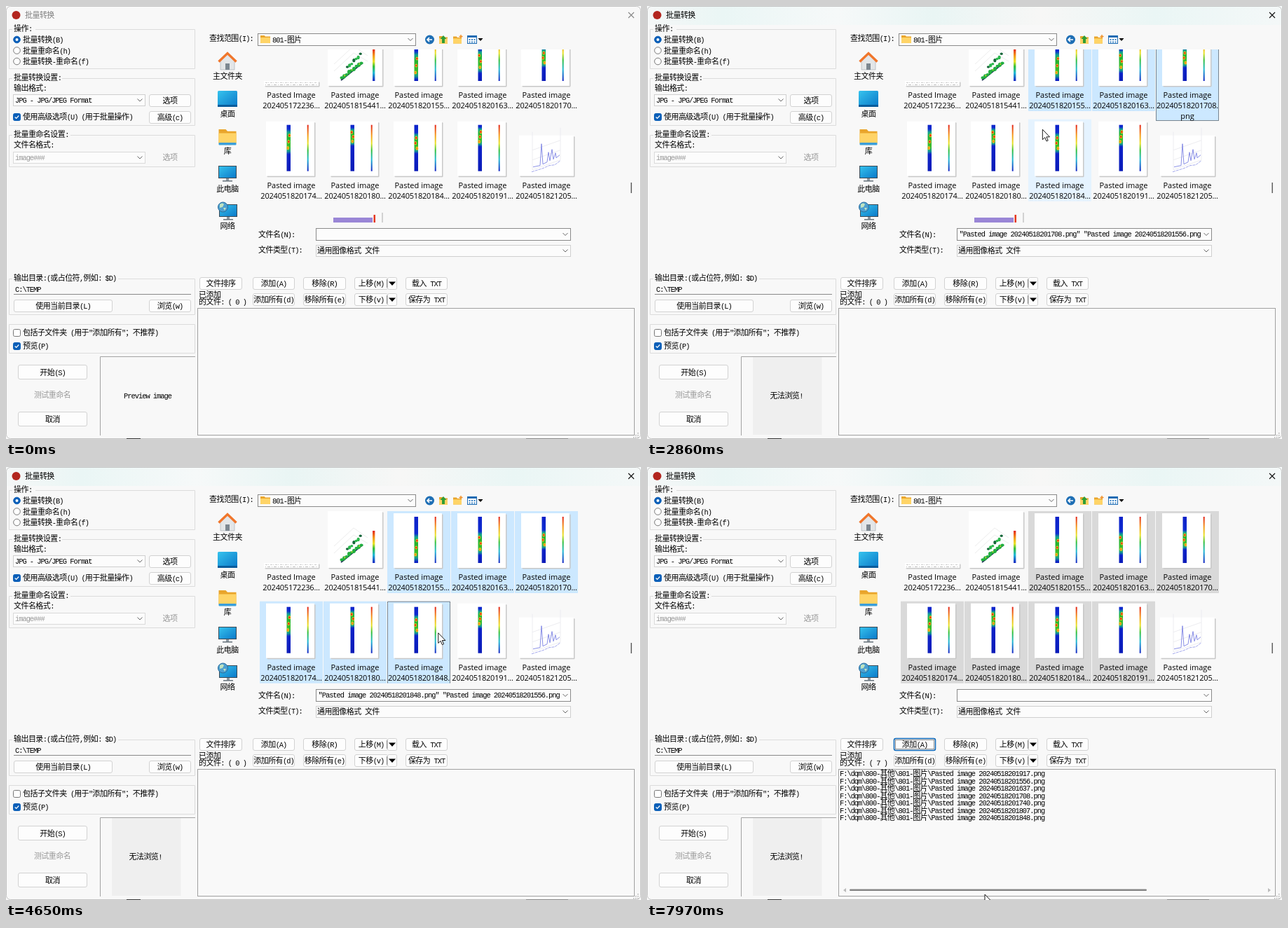
An HTML page that plays this animation: 906 px wide and 618 px high, repeating every 8000 ms.

```html
<!DOCTYPE html>
<html lang="zh">
<head>
<meta charset="utf-8">
<style>
html,body{margin:0;width:100%;height:100%;overflow:hidden;background:#f8f8f8}
svg{display:block;width:906px;height:618px}
text{fill:#000;white-space:pre}
.k{font:11px "Noto Sans CJK SC","Noto Sans CJK",sans-serif;letter-spacing:-.55px}
.m{font:10.4px "Liberation Mono",monospace;letter-spacing:-1.02px}
.n{font:11px "Open Sans",sans-serif}
.d{letter-spacing:-.2px}
.c{text-anchor:middle}
.off{fill:#999}
.ln{fill:none;stroke:#dcdcdc}
.ch{fill:none;stroke:#666}
</style>
</head>
<body>
<svg id="stage" viewBox="0 0 906 618"></svg>
<script>
const stage = document.getElementById('stage');
const LOOP = 8000;

// ---- drawing helpers ----
const rect = (x, y, w, h, fill, more = '') => `<rect x="${x}" y="${y}" width="${w}" height="${h}" fill="${fill}" ${more}/>`;
const path = (d, more) => `<path d="${d}" ${more}/>`;
const disc = (x, y, r, fill, more = '') => `<circle cx="${x}" cy="${y}" r="${r}" fill="${fill}" ${more}/>`;
const blob = (x, y, rx, ry, fill) => `<ellipse cx="${x}" cy="${y}" rx="${rx}" ry="${ry}" fill="${fill}"/>`;
const tag = id => id ? `id="${id}"` : '';
const runs = s => s.replace(/[\u2e80-\uffef]+|[^\u2e80-\uffef]+/g,
  r => `<tspan class="${/[\u2e80-\uffef]/.test(r) ? 'k' : 'm'}">${r}</tspan>`);
const text = (x, y, s, cls = '', id = '') => `<text x="${x}" y="${y}" class="${cls}" ${tag(id)}>${runs(s)}</text>`;
const box = (x, y, x2, y2, fill, stroke, more = '') =>
  rect(x + .5, y + .5, x2 - x - 1, y2 - y - 1, fill, `stroke="${stroke}" ${more}`);
const chevron = (x, y) => path(`M${x - 3.5} ${y - 2}l3.5 3.5 3.5-3.5`, 'class="ch"');
const button = (x, y, x2, y2, s, id = '') =>
  box(x, y, x2, y2, '#fdfdfd', '#d2d2d2', `rx="2.5" ${tag(id)}`) + text((x + x2) / 2, (y + y2) / 2 + 4, s, 'c');
const combo = (x, y, x2, y2, stroke, id = '') =>
  box(x, y, x2, y2, '#fcfcfc', stroke, tag(id)) + chevron(x2 - 8, (y + y2) / 2);
const group = (y, y2, s, w) =>
  path(`M9 ${y}.5H4.5V${y2}.5H269.5V${y}.5H${w}`, 'class="ln"') + text(11, y + 3, s);
const check = (y, on) => box(10, y, 21, y + 11, on ? '#0a5fb8' : '#fff', on ? '#0a5fb8' : '#777', 'rx="2"') +
  (on ? path(`M12.7 ${y + 5.5}l2 2 3.6-4`, 'fill="none" stroke="#fff" stroke-width="1.2"') : '');
const radio = (y, on) => disc(15.5, y, 4.8, on ? '#0a5fb8' : '#fff', `stroke="${on ? '#0a5fb8' : '#777'}"`) +
  (on ? disc(15.5, y, 2, '#fff') : '');
const folder = (x, y, w, h) =>
  path(`M${x} ${y}h${w * .4}l${w * .1} ${h * .14}h${w * .5}v${h * .86}h${-w}z`, 'fill="#e9a52c"') +
  rect(x, y + h * .28, w, h * .72, '#ffd467', 'rx="1"');
const monitor = (x, y) => box(x, y, x + 26, y + 18, 'url(#sea)', '#3d4a55') +
  rect(x + 11, y + 18, 4, 3, '#8b969e') + rect(x + 6, y + 21, 14, 1.5, '#67737c');
const stops = list => list.map(([o, c]) => `<stop offset="${o}" stop-color="${c}"/>`).join('');

// ---- thumbnails ----
// column, row, label, time part of the file name, heat centre and half height
const items = [
  [0, 0, '202405172236'], [1, 0, '2024051815441'],
  [2, 0, '2024051820155', '201556', 44, 20], [3, 0, '2024051820163', '201637', 38, 17],
  [4, 0, '2024051820170', '201708', 33, 14], [0, 1, '2024051820174', '201740', 24, 18],
  [1, 1, '2024051820180', '201807', 17, 13], [2, 1, '2024051820184', '201848', 26, 15],
  [3, 1, '2024051820191', '201917', 17, 14], [4, 1, '2024051821205']
];
const midX = c => 407 + 91 * c;
const top0 = r => 33 + 128.7 * r;

function page(x, y, w, h) {
  return rect(x + 1.5, y + 1.5, w, h, '#c8c8c8', 'rx="1"') + rect(x, y, w, h, '#fff');
}
function heat(i, x, y, mid, half) {
  const at = p => Math.max(0, p / 66).toFixed(3);
  const grad = `<linearGradient id="h${i}" x2="0" y2="1">` + stops([
    [0, '#0d22c9'], [at(mid - half), '#0e2bd0'], [at(mid - half * .75), '#12a58c'],
    [at(mid - half * .4), '#21b032'], [at(mid + half * .4), '#3cbc2c'],
    [at(mid + half * .75), '#139a8f'], [at(mid + half), '#0d22c9'], [1, '#0a1bb8']]) + '</linearGradient>';
  let s = grad + page(x - 36, y + 3, 69, 78) + rect(x - 6.5, y + 8, 5.5, 66, `url(#h${i})`);
  for (let k = 0; k < 3; k++) {
    const cx = x - 4.8 + (k * 2 + i) % 3 * 1.1, cy = y + 8 + mid + (k - 1) * half * .5;
    s += blob(cx, cy, 1.9, 2.6, '#e8d21d') + blob(cx, cy, 1.2, 1.6, k == 2 ? '#ef8a1c' : '#e0281a');
  }
  return s + rect(x + 22.7, y + 8, 2, 66, 'url(#scale)');
}
function strip(x, y) {
  return page(x - 39, y + 74, 78, 7) +
    path(`M${x - 37} ${y + 76.5}H${x + 37}`, 'stroke="#ccc" stroke-dasharray="3 1 1 2"') +
    path(`M${x - 37} ${y + 79.5}H${x + 37}`, 'stroke="#bbb" stroke-dasharray="1 2 4 2"');
}
function band(x, y) {
  let s = page(x - 39, y, 78, 81) +
    path(`M${x - 30} ${y + 50}l28-26 20 14M${x - 30} ${y + 60}l28-26 20 12`, 'stroke="#ededed" fill="none"') +
    path(`M${x - 20} ${y + 73}l31-25`, 'stroke="#1a2f52" stroke-width="2"');
  for (let k = 0; k < 9; k++) {
    const f = k / 8, wob = k * 7 % 3 - 1;
    s += blob(x - 19 + 28 * f, y + 70 - 22 * f + wob * .6, 2.5, 2.1 + k % 2, '#22b040');
    if (k < 7) s += blob(x - 11 + 25 * f, y + 55 - 25 * f + wob, 2.1, 1.7 + k % 2, k % 3 ? '#2bb74c' : '#16663a');
    if (k % 3 == 1) s += blob(x - 18 + 28 * f, y + 69 - 22 * f, 1.4, 1, '#d8d426');
  }
  return s + rect(x + 25, y + 28, 3.4, 46, 'url(#scale)');
}
function peaks(x, y) {
  return page(x - 39, y + 23, 78, 58) +
    path(`M${x - 20} ${y + 72}V${y + 18}M${x - 20} ${y + 72}l40-14M${x - 20} ${y + 58}l40-14M${x - 20} ${y + 44}l40-14M${x + 20} ${y + 58}V${y + 12}`, 'stroke="#ececf0" fill="none"') +
    path(`M${x - 19} ${y + 68}l10-2 2-31 2 29 6-3 2-14 2 12 3-16 2 14 3-9 1 7 5-4`, 'fill="none" stroke="#6c74e0" stroke-width=".8"') +
    path(`M${x - 21} ${y + 75}l16-5 9-4 8-1 8-6`, 'fill="none" stroke="#8c92e6" stroke-width=".8" stroke-dasharray="4 1"');
}
function item(it, i) {
  const [c, r, label, code, mid, half] = it, x = midX(c), y = top0(r);
  const art = i == 0 ? strip(x, y) : i == 1 ? band(x, y) : i == 9 ? peaks(x, y) : heat(i, x, y, mid, half);
  return rect(x - 45, y, 90, 117, 'none', `id="bg${i}"`) + art +
    `<g class="c"><text class="n" x="${x}" y="${y + 98}">Pasted ${i ? 'image' : 'Image'}</text>` +
    `<text class="n d" x="${x}" y="${y + 113}" id="nm${i}">${label}...</text>` +
    `<text class="n" x="${x}" y="${y + 128}" id="ext${i}">png</text></g>` +
    rect(x - 44.5, y + .5, 89, 130, 'none', `id="fo${i}" stroke="#222" stroke-dasharray="1 1"`);
}

// ---- static dialog ----
const places = ['主文件夹', '桌面', '库', '此电脑', '网络'];
const menu = [['文件排序', '', 276, 337], ['添加(A)', '添加所有(d)', 352, 412], ['移除(R)', '移除所有(e)', 424, 485],
  ['上移(M)', '下移(v)', 497, 545], ['载入 TXT', '保存为 TXT', 570, 630]];
const files = [8, 2, 3, 4, 5, 6, 7];
const fileName = i => `Pasted image 20240518${items[i][3]}.png`;

let s = `<defs>
<linearGradient id="scale" x2="0" y2="1">${stops([[0, '#e3241b'], [.22, '#f59a1d'], [.4, '#e9e32a'], [.55, '#35c13a'], [.75, '#22b9d4'], [1, '#1626c4']])}</linearGradient>
<linearGradient id="sea" x2="1" y2="1">${stops([[0, '#35c3ee'], [1, '#0b78c8']])}</linearGradient>
<linearGradient id="mist">${stops([[0, '#f5f7f7'], [.12, '#eaf6f5'], [.3, '#f6f9f9'], [.45, '#e9f5f4'], [.62, '#f7f7f6'], [.8, '#eaf6f5'], [1, '#f4f8f8']])}</linearGradient>
<clipPath id="view"><rect x="361" y="62" width="533" height="247"/></clipPath>
<clipPath id="field"><rect x="443" y="318" width="347" height="15"/></clipPath></defs>`;
s += rect(0, 0, 906, 618, '#f8f8f8') + rect(0, 0, 906, 27, 'url(#mist)', 'id="bar"');
s += rect(.5, .5, 905, 617, 'none', 'rx="6" stroke="#c3c3c3"');
s += rect(172, 617, 20, 1, '#333') + rect(742, 617, 60, 1, '#888');
s += disc(14.5, 13, 6, '#b3261f') + text(27, 17, '批量转换', '', 'title');
s += path('M888 9l8 8m0-8l-8 8', 'id="close" stroke="#888" stroke-width="1.1"');

s += group(33, 89, '操作:', 42) + radio(48, true) + radio(63.5) + radio(79);
['批量转换(B)', '批量重命名(h)', '批量转换-重命名(f)'].forEach((v, i) => s += text(24, 52 + 15.6 * i, v));
s += group(103, 170, '批量转换设置:', 80) + text(11, 121, '输出格式:') + combo(10, 126, 199, 143, '#cfcfcf') +
  text(13, 138, 'JPG - JPG/JPEG Format') + button(204, 126, 264, 144, '选项') + check(153, true) +
  text(24, 162, '使用高级选项(U) (用于批量操作)') + button(204, 150, 264, 168, '高级(c)');
s += group(184, 229, '批量重命名设置:', 92) + text(11, 202, '文件名格式:') + combo(10, 208, 199, 225, '#dadada') +
  text(13, 220, 'image###', 'off') + text(234, 220, '选项', 'c off');
s += group(389, 440, '输出目录:(或占位符,例如: $D)', 160) + text(13, 408, 'C:\\TEMP') +
  path('M11 411.5H264', 'stroke="#8a8a8a"') + button(11, 419, 152, 437, '使用当前目录(L)') + button(204, 419, 264, 437, '浏览(w)');
s += path('M4.5 454.5H269.5V495.5H4.5Z', 'class="ln"') + check(461) + check(480, true) +
  text(24, 470, '包括子文件夹 (用于"添加所有"；不推荐)') + text(24, 489, '预览(P)');
s += button(17, 512, 116, 533, '开始(S)') + text(66, 559, '测试重命名', 'c off') + button(17, 579, 116, 600, '取消');
s += path('M134.5 613V500.5H270', 'fill="none" stroke="#a3a3a3"') + rect(151, 501, 98.5, 111, '#efefef', 'id="blank"') +
  text(202, 560, 'Preview image', 'c', 'prev') + text(199, 560, '无法浏览!', 'c', 'fail');

s += text(290, 50, '查找范围(I):') + combo(359, 39, 585, 57, '#8a8a8a') + folder(363, 42, 14, 11) + text(380, 52, '801-图片');
s += disc(604.5, 48, 6.5, '#1f6fb5') + path('M608 48h-7m3-3l-3 3 3 3', 'fill="none" stroke="#fff" stroke-width="1.6"');
s += folder(618, 43, 12, 11) + path('M622 53v-6h-2.5l4.5-5 4.5 5H626v6z', 'fill="#2f9e36"');
s += folder(638, 43.5, 12, 10) + path('M649 41v5m-2.5-2.5h5', 'stroke="#f08a1c" stroke-width="1.3"');
s += box(658, 42, 672, 54, '#fff', '#1d6bb3') + rect(658, 42, 14, 3, '#1d6bb3');
for (let k = 0; k < 6; k++) s += rect(660.5 + k % 3 * 3.5, 47 + (k > 2 ? 3.5 : 0), 2, 2, '#3f86c6');
s += path('M673.5 46h7l-3.5 4z', 'fill="#000"');

s += path('M306 77v14h20V77l-10-9z', 'fill="#e3e6e8" stroke="#a9b0b5" stroke-width=".7"') + rect(313, 82, 6, 9, '#7c8790') +
  path('M303.5 79.5L316 67.5l12.5 12', 'fill="none" stroke="#f0762b" stroke-width="3.4"');
s += rect(302, 121, 28, 23, 'url(#sea)', 'rx="1.5"') + rect(302, 141, 28, 3, '#0a5c9b');
s += folder(303.5, 176, 25, 20) + rect(303.5, 195, 25, 3.5, '#3b9fd8', 'rx="1"');
s += monitor(303, 228) + monitor(304, 283) + disc(309.5, 287, 7, '#4d9fd0', 'stroke="#2a6d9c"') +
  path('M305 283q4-3 6 0l-2 4-4 1zM310 288l4 0-2 4z', 'fill="#bfe3c0"');
places.forEach((p, i) => s += text(316, 104 + 53.6 * i, p, 'c'));

s += `<g clip-path="url(#view)"><g id="scroll">${items.map(item).join('')}` +
  rect(467, 302, 56, 9, '#9a86d6') + rect(524.5, 298, 2.5, 14, '#e5371f') + rect(536.5, 295, 1, 16, '#aaa') + '</g></g>';
s += rect(891.5, 252, 1.4, 15, '#555', 'id="thumb"');
s += text(360, 330, '文件名(N):') + combo(442, 317, 806, 335, '#8a8a8a', 'edit') +
  `<g clip-path="url(#field)">${text(445.5, 329, '', '', 'name')}</g>`;
s += text(360, 352, '文件类型(T):') + combo(442, 341, 806, 358, '#cfcfcf', 'type') + text(444, 353, '通用图像格式 文件');
menu.forEach(([a, b, x, x2], i) => {
  s += button(x, 387, x2, 405, a, i == 1 ? 'add' : '');
  if (b) s += button(x, 410, x2, 428, b);
  if (i == 3) for (const y of [387, 410])
    s += box(544, y, 558, y + 18, '#fdfdfd', '#d2d2d2', 'rx="2"') + path(`M543.5 ${y + 3}v12`, 'stroke="#888"') +
      path(`M546 ${y + 6.5}h10l-5 5.5z`, 'fill="#000"');
});
s += box(354, 389, 410, 403, 'none', '#222', 'id="dots" stroke-dasharray="1 1"');
s += text(275, 416, '已添加') + text(275, 426, '的文件: ( 0 )', '', 'count');
s += box(273, 431, 897, 613, '#f9f9f9', '#a0a0a0');
s += '<g id="list">' + files.map((f, i) => text(275, 441.3 + 10.45 * i, `F:\\dqm\\800-其他\\801-图片\\${fileName(f)}`)).join('') +
  rect(289, 602.6, 424, 2.4, '#858585', 'rx="1.2"') +
  path('M284 601v6l-4-3zM886 601v6l4-3z', 'id="arrows" fill="#bbb"') + '</g>';
for (const [x, y] of [[901, 609], [901, 612], [898, 612], [901, 615], [898, 615], [895, 615]]) s += rect(x, y, 1.4, 1.4, '#aaa');
s += path('M0 0V14.6L3.4 11.5 5.7 16.8 7.9 15.8 5.6 10.7H10.2Z', 'id="mouse" fill="#fff" stroke="#000" stroke-width=".9"');
stage.innerHTML = s;

// ---- motion ----
const $ = id => document.getElementById(id);
const show = (id, on) => $(id).setAttribute('visibility', on ? 'visible' : 'hidden');
const set = (id, k, v) => $(id).setAttribute(k, v);
const route = [[290, 822, 606], [335, 536, 564], [380, 572, 208], [425, 590, 278], [470, 586, 345], [660, 586, 345],
  [760, 536, 165], [850, 523, 151], [990, 575, 128], [1220, 588, 100], [1500, 588, 100], [1850, 676, 105], [1950, 676, 105],
  [2200, 765, 105], [2450, 765, 105], [2860, 565, 176], [3100, 400, 212], [3470, 402, 222], [3800, 425, 224], [4030, 491, 224],
  [4320, 495, 230], [4520, 585, 235], [4600, 585, 235], [4740, 672, 240], [4960, 672, 240], [5300, 574, 358], [5490, 514, 354],
  [5720, 478, 358], [6000, 478, 358], [6200, 455, 368], [6500, 395, 390], [6750, 390, 393], [7550, 390, 393], [7640, 440, 450],
  [7750, 508, 528], [7850, 500, 568], [7910, 492, 590], [7970, 482, 610]];
const clicks = [[1450, 2], [1900, 3], [2270, 4], [3150, 5], [4140, 6], [4560, 7], [4920, 8]];
const PRESS = 6990, FILL = 7130;

function mouseAt(t) {
  const k = route.findIndex(p => p[0] > t);
  if (k < 0) return route[route.length - 1].slice(1);
  if (k == 0) return [-50, -50];
  const [a, x, y] = route[k - 1], [b, x2, y2] = route[k], f = (t - a) / (b - a);
  return [x + (x2 - x) * f, y + (y2 - y) * f];
}
function nameAt(t) {
  if (t >= FILL) return '';
  const done = clicks.filter(c => t >= (c[1] == 5 ? 3470 : c[0]));
  if (!done.length) return '';
  if (done.length == 1) return fileName(2);
  return `"${fileName(done[done.length - 1][1])}" "${fileName(2)}"`;
}
function draw(t) {
  const [mx, my] = mouseAt(t), inside = (x, y, x2, y2) => mx >= x && mx < x2 && my >= y && my < y2;
  set('mouse', 'transform', `translate(${mx} ${my})`);

  const active = t >= 1450, dy = 30 * Math.min(1, Math.max(0, (t - 3150) / 130));
  show('bar', active);
  $('title').style.fill = active ? '#000' : '#808080';
  set('close', 'stroke', active ? '#111' : '#888');
  set('scroll', 'transform', `translate(0 ${dy})`);
  set('thumb', 'y', 252 - dy / 30);

  const past = clicks.filter(c => t >= c[0]).map(c => c[1]);
  const focus = t < PRESS && past.length ? past[past.length - 1] : -1;
  items.forEach(([c, r, label, code], i) => {
    const x = midX(c), y = top0(r) + dy, on = past.includes(i), lit = i == focus;
    const hover = inside(x - 45, Math.max(62, y), x + 45, Math.min(309, y + 117));
    set('bg' + i, 'fill', on ? (t < PRESS ? '#cce8ff' : '#d9d9d9') : hover ? '#e5f3ff' : 'none');
    set('bg' + i, 'height', lit ? 131 : 117);
    show('ext' + i, lit);
    show('fo' + i, lit);
    $('nm' + i).textContent = lit ? `20240518${code}.` : label + '...';
  });

  $('name').innerHTML = runs(nameAt(t));
  set('edit', 'stroke', inside(442, 317, 806, 335) ? '#4a4a4a' : '#8a8a8a');
  const over = inside(442, 341, 806, 359);
  set('type', 'stroke', over ? '#3c8fd0' : '#cfcfcf');
  set('type', 'fill', over ? '#eef6fc' : '#fcfcfc');

  show('blank', t >= 1500);
  show('prev', t < 1500);
  show('fail', t >= 1500 && (t < 3470 || t >= 4220));

  const hot = inside(352, 387, 412, 405), down = t >= PRESS && t < FILL;
  set('add', 'fill', down ? '#cce4f7' : hot ? '#e5f1fb' : '#fdfdfd');
  set('add', 'stroke', t >= PRESS ? '#0a66b8' : hot ? '#3c8fd0' : '#d2d2d2');
  set('add', 'stroke-width', t >= PRESS ? 1.5 : 1);
  show('dots', t >= PRESS);

  show('list', t >= FILL);
  show('arrows', t >= 7900);
  $('count').innerHTML = runs(`的文件: ( ${t >= FILL ? 7 : 0} )`);
}
const start = performance.now();
function tick() {
  draw((performance.now() - start) % LOOP);
  requestAnimationFrame(tick);
}
tick();
</script>
</body>
</html>
```
